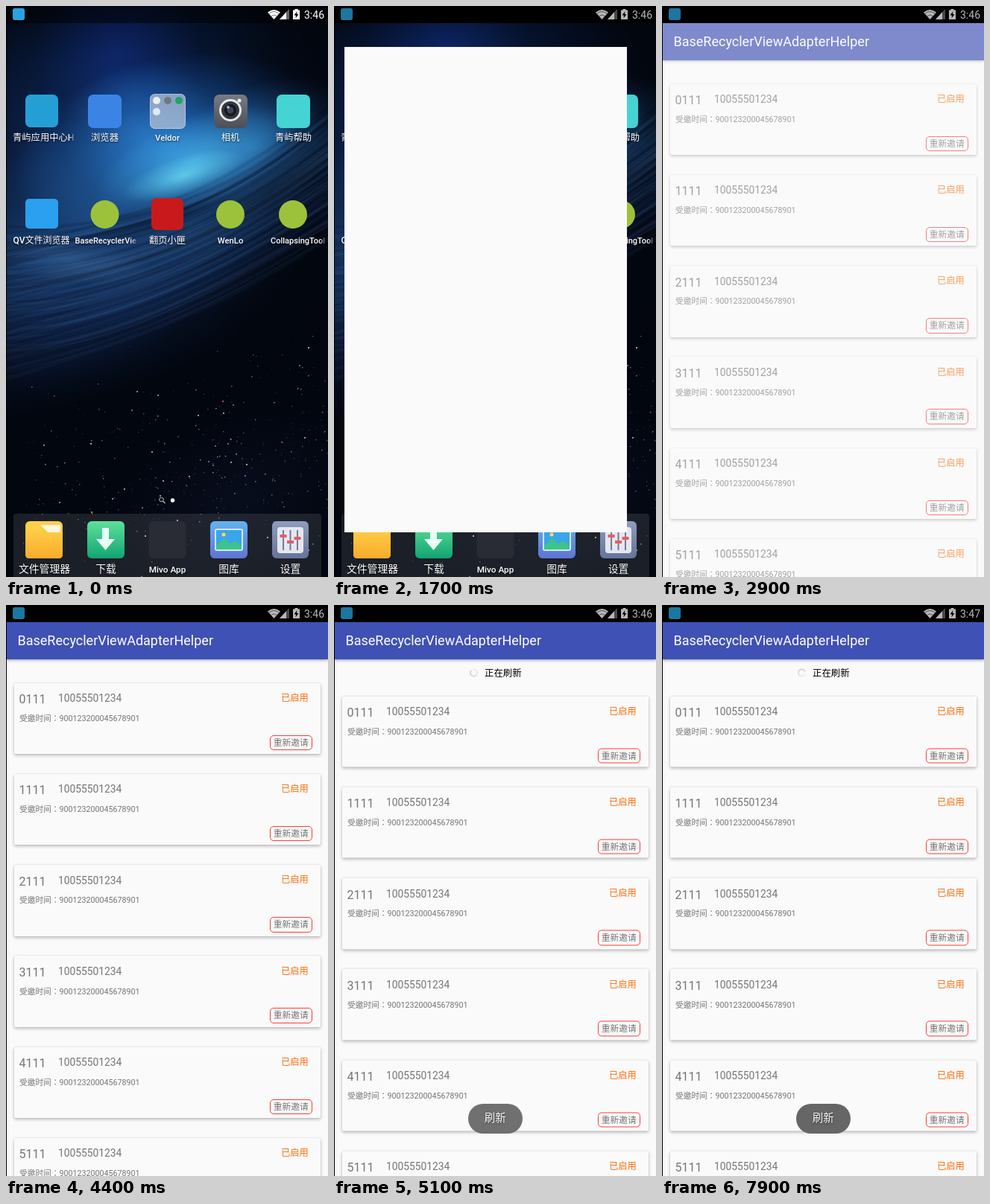
These frames come from a looping animation (432 px wide and 767 px high, 8 s). An HTML page with a canvas:

```html
<!DOCTYPE html>
<html lang="zh-CN">
<head>
<meta charset="utf-8">
<title>Pull to refresh</title>
<style>
html, body { margin: 0; width: 100%; height: 100%; overflow: hidden; background: #000; }
body { position: relative; font-family: Roboto, "Noto Sans CJK SC", "Noto Sans CJK", sans-serif; }
.stage { position: absolute; left: 0; top: 0; width: 432px; height: 767px; overflow: hidden; background: #000; }
.stage > canvas, .stage > svg { position: absolute; left: 0; top: 0; }
svg text { font-family: inherit; }
.labels { filter: drop-shadow(0 1px 1px rgba(0,0,0,.7)); fill: #fff; text-anchor: middle; font-weight: 500; }
.pressed, .status, .status svg, .window, .content, .bar, .list, .toast, .spin, .t1, .t2, .t3, .c1, .c2 {
  animation: 8s step-end infinite;
}
.pressed { animation-name: press; }

.status { position: absolute; left: 0; top: 0; width: 432px; height: 23px; animation-name: statusBg; }
.status svg { animation-name: statusDim; }
.c1 { animation-name: clockOld; }
.c2 { animation-name: clockNew; }

.window { position: absolute; left: 1px; top: 23px; width: 431px; height: 744px; overflow: hidden; background: #fafafa; animation-name: open; }
.content { position: absolute; left: -1px; top: -23px; width: 432px; height: 767px; animation-name: appear; }
.bar {
  position: absolute; left: 0; top: 23px; width: 432px; height: 50px; box-sizing: border-box; padding-left: 15.5px;
  background: #3f51b5; color: #fff; font-size: 18px; line-height: 50px; animation-name: barShade;
}
.list { position: absolute; inset: 0; animation-name: pull; }
.card { position: absolute; left: 11px; width: 410.5px; height: 95.5px; border-radius: 2px; background: #fafafa; color: #757575; box-shadow: 0 2px 4px rgba(0,0,0,.26), 0 0 2px rgba(0,0,0,.14); }
.card span, .hint { position: absolute; line-height: 20px; white-space: nowrap; }
.num { left: 6.5px; top: 12.5px; font-size: 16px; }
.tel { left: 59px; top: 10.7px; font-size: 13.8px; }
.date { left: 7px; top: 38.3px; font-size: 10.7px; font-family: Roboto, "Noto Sans CJK TC", "Noto Sans CJK", sans-serif; }
.state { left: 358px; top: 10.3px; font-size: 12.3px; color: #ff6f0f; }
.card .again { left: 342.5px; top: 70px; width: 57.5px; height: 20.5px; box-sizing: border-box; border: 1px solid #ff3b3b; border-radius: 5px; font-size: 11.8px; line-height: 19px; text-align: center; }
.hint { left: 202px; top: 64px; font-size: 12.4px; color: #000; }
.t1 { animation-name: hint1; }
.t2 { animation-name: hint2; }
.t3 { animation-name: hint3; }
.spin { position: absolute; left: 182px; top: 67.5px; width: 11px; height: 11px; animation-name: hint3; }
.spin i {
  display: block; width: 100%; height: 100%; border-radius: 50%;
  background: conic-gradient(rgba(130,130,130,.03), rgba(130,130,130,.5));
  mask: radial-gradient(closest-side, transparent 68%, #000 76%);
  -webkit-mask: radial-gradient(closest-side, transparent 68%, #000 76%);
  animation: turn 1.2s steps(12) infinite;
}
.toast { position: absolute; left: 179.5px; top: 670px; width: 73.5px; height: 40px; border-radius: 20px; background: #666; color: #fff; font-size: 14.4px; line-height: 39px; text-align: center; text-shadow: 0 1px 2px rgba(0,0,0,.7); animation-name: toast; }

@keyframes press { 0%, 21.25%, 100% { filter: none; } 18.75% { filter: brightness(.97); } }
@keyframes statusBg { 0% { background: transparent; } 21.25%, 100% { background: #000; } }
@keyframes statusDim { 0% { opacity: 1; } 21.25%, 100% { opacity: .72; } }
@keyframes clockOld { 0% { visibility: visible; } 75%, 100% { visibility: hidden; } }
@keyframes clockNew { 0% { visibility: hidden; } 75%, 100% { visibility: visible; } }
@keyframes open {
  0% { visibility: hidden; clip-path: inset(32px 39px 60px 13px); }
  21.25% { visibility: visible; clip-path: inset(32px 39px 60px 13px); }
  22.5% { visibility: visible; clip-path: inset(4px 5px 8px 2px); }
  23.75%, 100% { visibility: visible; clip-path: inset(0 0 0 0); }
}
@keyframes appear { 0% { opacity: 0; } 36.25% { opacity: .66; } 37.5%, 100% { opacity: 1; } }
@keyframes barShade {
  0% { box-shadow: 0 1px 4px rgba(0,0,0,.34); }
  55% { box-shadow: 0 1px 4px rgba(0,0,0,.38); }
  56.25%, 100% { box-shadow: 0 1px 4px rgba(0,0,0,.42); }
}
@keyframes pull {
  0% { transform: translateY(0); }
  58.75% { transform: translateY(4px); }
  60% { transform: translateY(12px); }
  61.25% { transform: translateY(21px); }
  62.5% { transform: translateY(26px); }
  63.75%, 100% { transform: translateY(17.5px); }
}
@keyframes hint1 { 0%, 61.25%, 100% { opacity: 0; } 58.75% { opacity: 1; } }
@keyframes hint2 { 0%, 62.5%, 100% { opacity: 0; } 61.25% { opacity: 1; } }
@keyframes hint3 { 0% { opacity: 0; } 62.5%, 100% { opacity: 1; } }
@keyframes toast { 0% { opacity: 0; } 62.5% { opacity: .35; } 63.75% { opacity: .93; } 65%, 100% { opacity: 1; } }
@keyframes turn { from { transform: rotate(225deg); } to { transform: rotate(585deg); } }
</style>
</head>
<body>
<div class="stage">
  <canvas id="sky" width="432" height="767"></canvas>

  <svg width="432" height="767" viewBox="0 0 432 767">
    <defs>
      <linearGradient id="fade"><stop offset=".9" stop-color="#fff"/><stop offset="1" stop-color="#fff" stop-opacity=".25"/></linearGradient>
      <linearGradient id="gray" x2="0" y2="1"><stop stop-color="#777b84"/><stop offset="1" stop-color="#4c4f58"/></linearGradient>
      <linearGradient id="gold" x2="0" y2="1"><stop stop-color="#ffd24a"/><stop offset="1" stop-color="#f9ab2c"/></linearGradient>
      <linearGradient id="green" x2="0" y2="1"><stop stop-color="#5fe09a"/><stop offset="1" stop-color="#12a571"/></linearGradient>
      <linearGradient id="blue" x2="0" y2="1"><stop stop-color="#62b4ee"/><stop offset="1" stop-color="#5f74d2"/></linearGradient>
      <linearGradient id="slate" x2="0" y2="1"><stop stop-color="#8f9cbd"/><stop offset="1" stop-color="#66739a"/></linearGradient>
    </defs>

    <rect x="26" y="119" width="44" height="44" rx="7" fill="#249fd6"/>
    <rect x="110" y="119" width="45" height="45" rx="7" fill="#3c83e6"/>
    <rect x="193.5" y="118.5" width="47" height="46" rx="6" fill="#b9c6dc" fill-opacity=".72" stroke="#c9d6ea" stroke-opacity=".8"/>
    <circle cx="202" cy="127" r="5" fill="#e9f0f0"/>
    <circle cx="217" cy="127" r="5" fill="#707880"/>
    <circle cx="232" cy="127" r="5" fill="#1fa463"/>
    <circle cx="202" cy="142" r="5" fill="#dfeaf2"/>
    <g>
      <rect x="279" y="119" width="45" height="45" rx="7" fill="url(#gray)"/>
      <circle cx="301" cy="140" r="15" fill="#e8eaec"/>
      <circle cx="301" cy="140" r="12" fill="#34373f"/>
      <circle cx="301" cy="140" r="8" fill="#17191f"/>
      <circle cx="301" cy="140" r="4.5" fill="#3d4657"/>
      <circle cx="298" cy="136" r="2" fill="#aab4c4"/>
      <circle cx="313" cy="127" r="2.5" fill="#eee"/>
    </g>
    <rect x="363" y="119" width="45" height="45" rx="7" fill="#45d3d3"/>
    <rect x="26" y="259" width="44" height="40" rx="5" fill="#2b9ff0"/>
    <circle class="pressed" cx="132.5" cy="280" r="19" fill="#9cc23c"/>
    <rect x="195" y="258" width="43" height="43" rx="7" fill="#c81a1c"/>
    <circle cx="301" cy="280" r="19" fill="#9cc23c"/>
    <circle cx="385" cy="280" r="19" fill="#9cc23c"/>

    <circle cx="208.5" cy="663" r="2.8" fill="none" stroke="#bbb"/>
    <path d="M210.5 665l3 3" stroke="#bbb" stroke-width="1.2"/>
    <circle cx="223.5" cy="664" r="2.7" fill="#fff"/>

    <rect x="10" y="682" width="413" height="90" rx="4" fill="#fff" fill-opacity=".1"/>
    <g>
      <rect x="26" y="692" width="50" height="50" rx="6" fill="url(#gold)"/>
      <path d="M46 697h27v11H57z" fill="#fff6e0"/>
      <path d="M26 703q0-5 5-5h13l8 9h24v30q0 5-5 5H31q-5 0-5-5z" fill="url(#gold)"/>
    </g>
    <rect x="109" y="692" width="50" height="50" rx="6" fill="url(#green)"/>
    <path d="M129 701h9v15h8l-12.500 15-12.500-15h8z" fill="#e9fff6"/>
    <rect x="191.5" y="692" width="50" height="50" rx="6" fill="#292b35"/>
    <g>
      <rect x="274" y="692" width="50" height="50" rx="6" fill="url(#blue)"/>
      <rect x="281" y="703" width="36" height="28" rx="2" fill="#3aa5e8" stroke="#d5e6fa" stroke-width="2"/>
      <path d="M282 730v-5l11-10 8 8 6-5 9 8v4z" fill="#3cc48a"/>
      <circle cx="292" cy="710" r="2.5" fill="#ffd95a"/>
    </g>
    <g>
      <rect x="357" y="692" width="49" height="50" rx="6" fill="url(#slate)"/>
      <rect x="364" y="700" width="35" height="35" rx="4" fill="#e4e7f0"/>
      <path d="M372 704v27M381.5 704v27M391 704v27" stroke="#747d95" stroke-width="2"/>
      <path d="M367.5 712h9M377 720h9M386.5 715h9" stroke="#e05f66" stroke-width="4"/>
    </g>
    <g class="labels" id="labels"></g>
  </svg>

  <div class="window">
    <div class="content">
      <div class="list" id="list">
        <span class="hint t1">下拉刷新</span><span class="hint t2">松开刷新</span><span class="hint t3">正在刷新</span>
        <div class="spin"><i></i></div>
      </div>
      <div class="bar">BaseRecyclerViewAdapterHelper</div>
      <div class="toast">刷新</div>
    </div>
  </div>

  <div class="status">
    <svg width="432" height="23" fill="#fff">
      <rect x="9" y="3" width="16" height="16" rx="3" fill="#2ba3de"/>
      <path d="M351 8.5Q359.500 1.5 368 8.5L359.500 18z"/>
      <path d="M353 10q6.500-5 13 0M356 13.300q3.500-2.500 7 0" fill="none" stroke="#000" stroke-opacity=".55"/>
      <path d="M380 4v14h-13z" fill-opacity=".4"/>
      <path d="M376 8.300V18h-9z"/>
      <path d="M387.500 4h4v1.500h2.500V18h-9V5.500h2.500z"/>
      <path d="M390.500 7l-4 5.500h2.500l-.500 4 4-5.500h-2.500z" fill="#000"/>
      <text class="c1" x="400" y="17" font-size="14">3:46</text>
      <text class="c2" x="400" y="17" font-size="14">3:47</text>
    </svg>
  </div>
</div>

<script>
// Launcher labels: text, x, baseline, size, cut off at the cell edge
const labels = [
  ['青屿应用中心H', 9, 180.5, 12.3, true], ['浏览器', 132.5, 180.5, 12.3], ['Veldor', 216.5, 180.5, 11.3],
  ['相机', 301, 180.5, 12.3], ['青屿帮助', 385.5, 180.5, 12.3],
  ['QV文件浏览器', 47.5, 318.5, 12], ['BaseRecyclerVie', 92.5, 318.5, 11, true], ['翻页小匣', 216.5, 318.5, 12.3],
  ['WenLo', 301, 318.5, 11.3], ['CollapsingTool', 355, 318.5, 11, true],
  ['文件管理器', 51.5, 760.5, 13.8], ['下载', 134, 760.5, 13.8], ['Mivo App', 216.5, 760.5, 11.8],
  ['图库', 299, 760.5, 13.8], ['设置', 381.5, 760.5, 13.8]
];
document.getElementById('labels').innerHTML = labels.map(([text, x, y, size, cut]) =>
  `<text x="${x}" y="${y}" font-size="${size}"${cut ? ' text-anchor="start" fill="url(#fade)"' : ''}>${text}</text>`).join('');

const card = i => `<div class="card" style="top:${104.5 + 122.25 * i}px">
  <span class="num">${i}111</span><span class="tel">10055501234</span>
  <span class="date" lang="zh-TW">受邀时间：900123200045678901</span>
  <span class="state">已启用</span><span class="again">重新邀请</span></div>`;
document.getElementById('list').insertAdjacentHTML('beforeend', [0, 1, 2, 3, 4, 5].map(card).join(''));

// Wallpaper
const g = document.getElementById('sky').getContext('2d');
let seed = 11;
const rnd = () => (seed = (seed * 16807) % 2147483647) / 2147483647;

function blob(x, y, rx, ry, deg, rgb, alpha) {
  g.save();
  g.translate(x, y);
  g.rotate(deg * Math.PI / 180);
  g.scale(rx, ry);
  const grad = g.createRadialGradient(0, 0, 0, 0, 0, 1);
  grad.addColorStop(0, `rgba(${rgb},${alpha})`);
  grad.addColorStop(.5, `rgba(${rgb},${alpha * .45})`);
  grad.addColorStop(1, `rgba(${rgb},0)`);
  g.fillStyle = grad;
  g.fillRect(-1, -1, 2, 2);
  g.restore();
}

// One lane of the disc; k runs from its upper rim to its lower edge
function lane(k, sway, rgb, alpha, width) {
  g.strokeStyle = `rgba(${rgb},${alpha})`;
  g.lineWidth = width;
  g.beginPath();
  g.moveTo(-10, 312 + k * 180 + sway);
  g.bezierCurveTo(150, 290 + k * 180 - sway, 285, 270 + k * 130 + sway, 445, 125 + k * 180);
  g.stroke();
}

g.fillStyle = '#02060f';
g.fillRect(0, 0, 432, 767);
g.globalCompositeOperation = 'screen';
blob(170, 120, 260, 190, 0, '14,50,120', .6);
blob(150, 60, 110, 110, 0, '12,26,110', .5);
blob(40, 190, 170, 170, 0, '10,28,64', .6);
blob(215, 190, 210, 120, -15, '28,100,190', .8);
blob(185, 170, 110, 95, 0, '28,95,190', .45);
blob(330, 190, 150, 80, -25, '32,95,160', .75);
blob(300, 290, 230, 95, -32, '22,58,108', .6);
blob(110, 300, 280, 150, -14, '24,66,125', .65);
blob(60, 350, 240, 160, -15, '18,46,90', .55);
blob(130, 410, 300, 110, -20, '14,34,72', .55);
g.globalCompositeOperation = 'source-over';
blob(355, 248, 130, 28, -32, '3,10,26', .6);
blob(225, 284, 150, 18, -14, '6,20,46', .5);
for (let i = 0; i < 150; i++) {
  const k = rnd(), dark = rnd() < .5;
  lane(k, (rnd() - .5) * 36, dark ? '3,10,26' : '80,130,195', (dark ? .14 : .08) * (1 - k * .6), 1 + rnd() * 5);
}
g.globalCompositeOperation = 'screen';
blob(250, 208, 140, 58, -22, '45,145,220', .65);
blob(238, 228, 85, 26, -18, '80,205,235', .65);
blob(90, 342, 110, 30, 8, '60,80,125', .35);
blob(310, 662, 190, 110, -20, '16,18,36', .4);
g.globalCompositeOperation = 'source-over';
blob(430, 50, 150, 130, 0, '3,7,16', .7);
blob(440, 430, 170, 150, 0, '2,5,12', .7);

const hues = ['190,205,255', '255,190,150', '120,150,230', '230,120,100', '220,225,240'];
for (let i = 0; i < 420; i++) {
  const x = 432 * Math.pow(rnd(), .7);
  const y = 655 - x * .15 + (rnd() + rnd() + rnd() - 1.5) * 130;
  const glow = rnd();
  const size = glow > .9 ? 2 : 1 + glow * .6;
  g.fillStyle = `rgba(${hues[Math.floor(rnd() * 5)]},${.15 + glow * glow * .6})`;
  g.fillRect(Math.round(x), Math.round(y), size, size);
}
g.fillStyle = 'rgba(0,0,0,.5)';
g.fillRect(0, 0, 432, 23);
g.fillStyle = '#000';
g.fillRect(0, 0, 1, 767);
</script>
</body>
</html>
```
